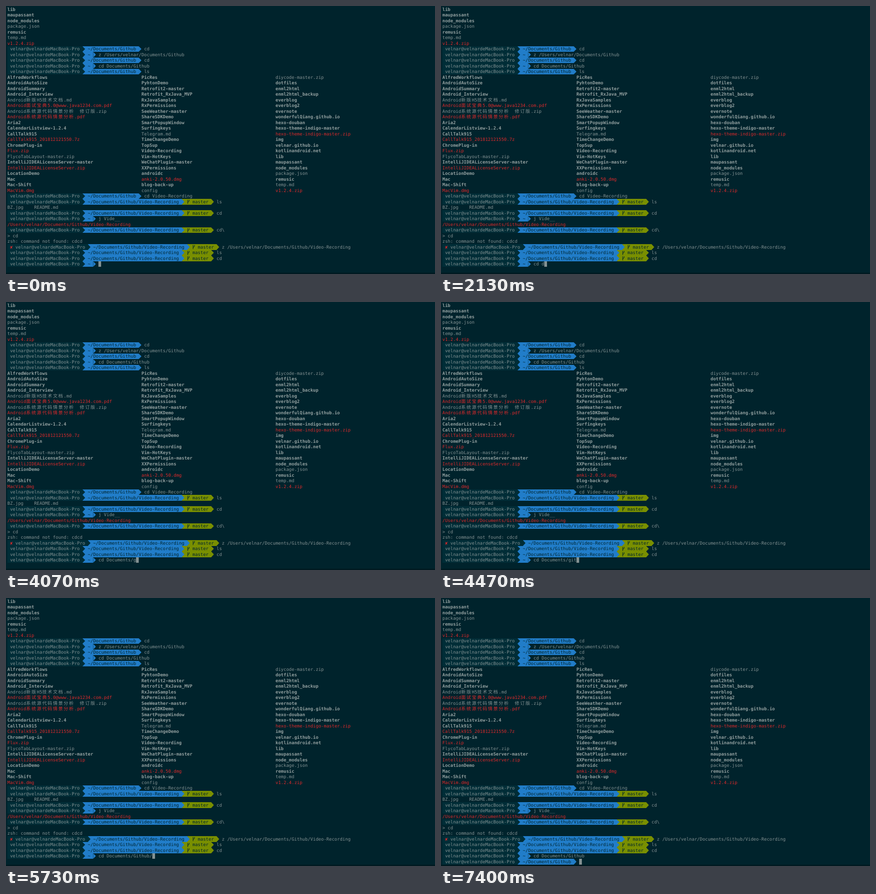
Animation, 947 px wide and 592 px high, one loop 8 s. Source, as an HTML page:

```html
<!DOCTYPE html>
<html lang="en">
<head>
<meta charset="utf-8">
<title>Terminal</title>
<style>
  html, body { margin: 0; width: 100%; height: 100%; overflow: hidden; background: #00232c; }
  svg { display: block; width: 947px; height: 592px; }
  text {
    font: 9.833px "DejaVu Sans Mono", "Noto Sans Mono", monospace;
    text-rendering: geometricPrecision;
    white-space: pre;
    fill: #839192;
  }
  .cjk { font: 10px "Noto Sans CJK SC", "Noto Sans CJK", sans-serif; letter-spacing: 1.84px; }
  rect { shape-rendering: crispEdges; }
  .b { font-weight: bold; fill: #929f9f; }
  .r { fill: #dc2a2c; }
  .k { fill: #00262f; }
  .seg { fill: #002d37; }
  .blue { fill: #217dc9; }
  .green { fill: #798f00; }
  .branch { fill: none; stroke: #00262f; stroke-width: 1.1; }
  .cursor { fill: #839192; }
  .edge { fill: #001a21; }
</style>
</head>
<body>
<svg id="term" viewBox="0 0 947 592"></svg>
<script>
const CELL = 5.92, LINE = 12.5, LEFT = 3, TOP = 1.3;
const USER = "velnar", HOST = "velnardeMacBook-Pro";
const GH = "~/Documents/Github", VR = GH + "/Video-Recording";
const HOME_VR = `/Users/${USER}/Documents/Github/Video-Recording`;
const term = document.getElementById("term");

const colX = c => LEFT + c * CELL;
const rowY = r => Math.round(TOP + r * LINE);

function add(parent, tag, attrs, text) {
  const el = document.createElementNS("http://www.w3.org/2000/svg", tag);
  for (const key in attrs) el.setAttribute(key, attrs[key]);
  if (text) el.textContent = text;
  parent.append(el);
  return el;
}

// Wide characters take two cells each
function put(col, row, str, cls = "", parent = term) {
  for (const run of str.match(/[\u3000-\u9fff]+|[^\u3000-\u9fff]+/g)) {
    const wide = run.charCodeAt(0) >= 0x3000;
    add(parent, "text", {
      x: colX(col), y: TOP + row * LINE + 9.5, class: cls + (wide ? " cjk" : "")
    }, run);
    col += run.length * (wide ? 2 : 1);
  }
}

function bar(from, to, row, cls, parent) {
  add(parent, "rect", {
    x: colX(from), y: rowY(row), width: (to - from) * CELL,
    height: rowY(row + 1) - rowY(row), class: cls
  });
}

function tip(col, row, cls, parent) {
  const x = colX(col), y = rowY(row), end = rowY(row + 1);
  add(parent, "path", { d: `M${x} ${y}L${x + CELL} ${(y + end) / 2}L${x} ${end}Z`, class: cls });
}

function prompt(row, path, cmd = "", failed = false, parent = term) {
  const user = failed ? 3 : 1;
  const blue = user + 27, after = blue + path.length + 3;
  bar(0, blue, row, "seg", parent);
  bar(blue, after, row, "blue", parent);
  tip(blue, row, "seg", parent);
  if (failed) put(1, row, "✘", "r", parent);
  put(user, row, `${USER}@${HOST}`, "", parent);
  put(blue + 2, row, path, "k", parent);

  let end = after;
  if (path === VR) {
    end = after + 11;
    bar(after, end, row, "green", parent);
    const x = colX(after + 2), y = rowY(row);
    add(parent, "path", {
      d: `M${x + 1.5} ${y + 2}V${y + 11}M${x + 4.6} ${y + 2}V${y + 4.5}L${x + 1.5} ${y + 8}`,
      class: "branch"
    });
    put(after + 4, row, "master", "k", parent);
  }
  tip(after, row, "blue", parent);
  if (end > after) tip(end, row, "green", parent);
  if (cmd) put(end + 2, row, cmd, "", parent);
}

// Prefix: * folder (bold), ! archive (red)
function list(col, row, items) {
  items.trim().split("\n").forEach((item, i) => {
    const cls = { "*": "b", "!": "r" }[item[0]] || "";
    put(col, row + i, cls ? item.slice(1) : item, cls);
  });
}

const tail = `*lib
*maupassant
*node_modules
package.json
*remusic
temp.md
!v1.2.4.zip`;

list(0, 0, tail);
prompt(7, GH, "cd");
prompt(8, "~", `z /Users/${USER}/Documents/Github`);
prompt(9, GH, "cd");
prompt(10, "~", "cd Documents/Github");
prompt(11, GH, "ls");

list(0, 12, `*AlfredWorkflows
*AndroidAutoSize
*AndroidSummary
*Android_Interview
Android新版H5技术文档.md
!Android面试宝典5.0@www.java1234.com.pdf
Android系统源代码情景分析\u3000修订版.zip
!Android系统源代码情景分析.pdf
*Aria2
*CalendarListview-1.2.4
*CallTalk915
!CallTalk915_201812121550.7z
*ChromePlug-in
!Flux.zip
FlycoTabLayout-master.zip
*IntelliJIDEALicenseServer-master
!IntelliJIDEALicenseServer.zip
*LocationDemo
*Mac
*Mac-Shift
!MacVim.dmg`);

list(50, 12, `*PicRes
*PyhtonDemo
*Retrofit2-master
*Retrofit_RxJava_MVP
*RxJavaSamples
*RxPermissions
*SeeWeather-master
*ShareSDKDemo
*SmartPopupWindow
*Surfingkeys
Telegram.md
*TimeChangeDemo
*TopSup
*Video-Recording
*Vim-HotKeys
*WeChatPlugin-master
*XXPermissions
*androidc
!anki-2.0.50.dmg
*blog-back-up
config`);

list(100, 12, `diycode-master.zip
*dotfiles
*enml2html
*enml2html_backup
*everblog
*everblog2
*evernote
*wonderfulQiang.github.io
*hexo-douban
*hexo-theme-indigo-master
!hexo-theme-indigo-master.zip
*img
*${USER}.github.io
*kotlinandroid.net
${tail}`);

prompt(33, GH, "cd Video-Recording");
prompt(34, VR, "ls");
put(0, 35, "BZ.jpg    README.md");
prompt(36, VR, "cd");
prompt(37, "~", "j Vide__");
put(0, 38, HOME_VR, "r");
prompt(39, VR, "cd\\");
put(0, 40, "> cd");
put(0, 41, "zsh: command not found: cdcd");
prompt(42, VR, "z " + HOME_VR, true);
prompt(43, VR, "ls");
prompt(44, VR, "cd");
prompt(45, "~");
add(term, "rect", { x: 0, y: 589, width: 947, height: 3, class: "edge" });

// Live input line, cursor and the closing prompt
const input = add(term, "text", { x: colX(34), y: TOP + 45 * LINE + 9.5 });
const closing = add(term, "g", {});
prompt(46, GH, "", false, closing);
const cursor = add(term, "rect", { width: CELL, class: "cursor" });

const typing = [
  [0, ""], [1400, "c"], [1470, "cd"], [1670, "cd "], [2130, "cd d"],
  [2400, "cd do"], [2670, "cd doc"], [2930, "cd Documents/"],
  [4070, "cd Documents/g"], [4130, "cd Documents/gi"], [4470, "cd Documents/git"],
  [5200, "cd Documents/gi"], [5530, "cd Documents/git"],
  [5730, "cd Documents/Github/"], [7270, "cd Documents/Github"]
];
const ENTER = 7270, DONE = 7330, LOOP = 8000;

function draw() {
  const t = performance.now() % LOOP;
  const text = typing.filter(([at]) => at <= t).pop()[1];
  const row = t < ENTER ? 45 : 46;
  const col = t < ENTER ? 34 + text.length : t < DONE ? 0 : 51;
  input.textContent = text;
  closing.setAttribute("visibility", t < DONE ? "hidden" : "visible");
  cursor.setAttribute("x", colX(col));
  cursor.setAttribute("y", rowY(row));
  cursor.setAttribute("height", rowY(row + 1) - rowY(row));
  requestAnimationFrame(draw);
}
draw();
</script>
</body>
</html>
```
